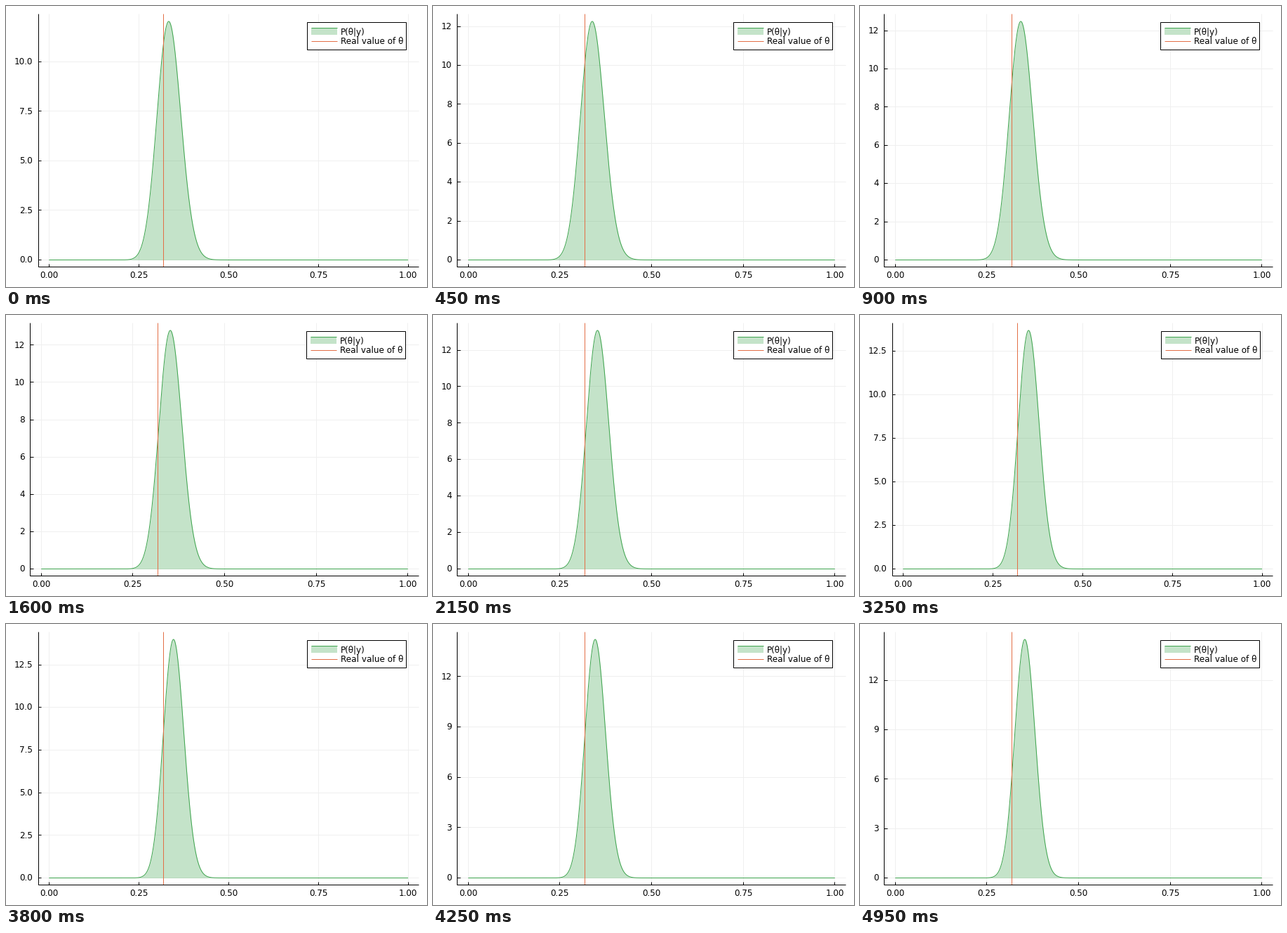
A matplotlib script for the animation above (5 s loop, 600 px wide and 400 px high).

```python
import math

import numpy as np
import matplotlib.pyplot as plt
from matplotlib.animation import FuncAnimation
from matplotlib.patches import Rectangle

W, H, DPI = 600, 400, 100
FRAMES, INTERVAL = 100, 50
PX = 72 / DPI  # points per pixel
SNAP = 0.5     # pixel snapping rounds straight lines up by half a pixel

GREEN = (0.2422, 0.6433, 0.3044)
ORANGE = (0.8889, 0.4356, 0.2781)
GRID = "#efefef"

RIGHT, TOP, BOTTOM = 588.4, 11.8, 371.6
BASE, PEAK = 361.5, 21.9
TICK = 4.5
THETA = 1 / math.pi
FIRST_N = 201

# Running number of successes, one Bernoulli draw per frame.
DRAWS = [0, 18, 22, 32, 44, 54, 67, 76, 85, 99]
HITS = [67, 75, 77, 82, 86, 89, 94, 96, 99, 106]

plt.rcParams["font.family"] = "DejaVu Sans"
fig = plt.figure(figsize=(W / DPI, H / DPI), dpi=DPI, facecolor="white")
ax = fig.add_axes([0, 0, 1, 1])
theta = np.linspace(0, 1, 1001)


def beta_pdf(x, hits, n):
    """Posterior of a Bernoulli rate under a flat prior."""
    misses = n - hits
    log_c = math.lgamma(n + 2) - math.lgamma(hits + 1) - math.lgamma(misses + 1)
    x = np.clip(x, 1e-12, 1 - 1e-12)
    return np.exp(log_c + hits * np.log(x) + misses * np.log(1 - x))


def tick_step(peak):
    top = 1.03 * peak
    if top < 12.5:
        return 2.5
    if top < 14:
        return 2
    return 2.5 if 1.06 * peak < 15 else 3


def straight(xs, ys, color, z):
    ax.plot(np.subtract(xs, SNAP), np.subtract(ys, SNAP), color=color, lw=PX,
            zorder=z, solid_capstyle="butt", solid_joinstyle="miter")


def box(x, y, w, h, z, **style):
    ax.add_patch(Rectangle((x - SNAP, y - SNAP), w, h, zorder=z, **style))


def label(x, y, text, ha, z=6):
    ax.text(x, y, text, ha=ha, va="baseline", fontsize=12 * PX,
            color="black", zorder=z)


def draw_axes(left, x_pos, y_pos, peak, step):
    for v in (0, 0.25, 0.5, 0.75, 1):
        x = x_pos(v)
        straight([x, x], [TOP, BOTTOM], GRID, 1)
        straight([x, x], [BOTTOM, BOTTOM - TICK], "black", 5)
        label(x, 387.2, f"{v:.2f}", "center")
    for v in np.arange(0, 1.03 * peak, step):
        y = y_pos(v)
        straight([left, RIGHT], [y, y], GRID, 1)
        straight([left, left + TICK], [y, y], "black", 5)
        text = f"{v:.1f}" if step == 2.5 else f"{v:.0f}"
        label(left - 8, y + 3.7, text, "right")
    straight([left, left, RIGHT], [TOP, BOTTOM, BOTTOM], "black", 5)


def draw_legend(dx):
    box(428.5 + dx, 23.8, 141.2, 38.8, 7,
        facecolor="white", edgecolor="black", lw=PX)
    x0, x1 = 434.5 + dx, 471.2 + dx
    box(x0, 31.2, x1 - x0, 10.6, 8, facecolor=GREEN, alpha=0.3, lw=0)
    straight([x0, x1], [31.2, 31.2], GREEN, 9)
    straight([x0, x1], [50, 50], ORANGE, 9)
    label(476.2 + dx, 41.2, "P(θ|y)", "left", 9)
    label(476.2 + dx, 54.2, "Real value of θ", "left", 9)


def draw(i):
    ax.cla()
    ax.set_xlim(0, W)
    ax.set_ylim(H, 0)
    ax.axis("off")

    n = FIRST_N + i
    hits = math.floor(np.interp(i, DRAWS, HITS) + 0.5)
    pdf = beta_pdf(theta, hits, n)
    peak = float(beta_pdf(hits / n, hits, n))
    step = tick_step(peak)
    wide = step == 2.5
    left = 46.0 if wide else 34.6
    unit = (RIGHT - left) / 1.06

    def x_pos(v):
        return left + (v + 0.03) * unit

    def y_pos(v):
        return BASE - v / peak * (BASE - PEAK)

    draw_axes(left, x_pos, y_pos, peak, step)

    xs, ys = x_pos(theta), y_pos(pdf)
    ax.fill_between(xs, BASE, ys, color=GREEN, alpha=0.3, lw=0, zorder=2)
    ax.plot(xs, ys, color=GREEN, lw=PX, zorder=3, solid_capstyle="butt")
    straight([x_pos(THETA)] * 2, [TOP, BOTTOM], ORANGE, 4)
    draw_legend(1 if wide else 0)
    return []


anim = FuncAnimation(fig, draw, frames=FRAMES, interval=INTERVAL,
                     init_func=lambda: draw(0), repeat=True, repeat_delay=0)
plt.show()
```
